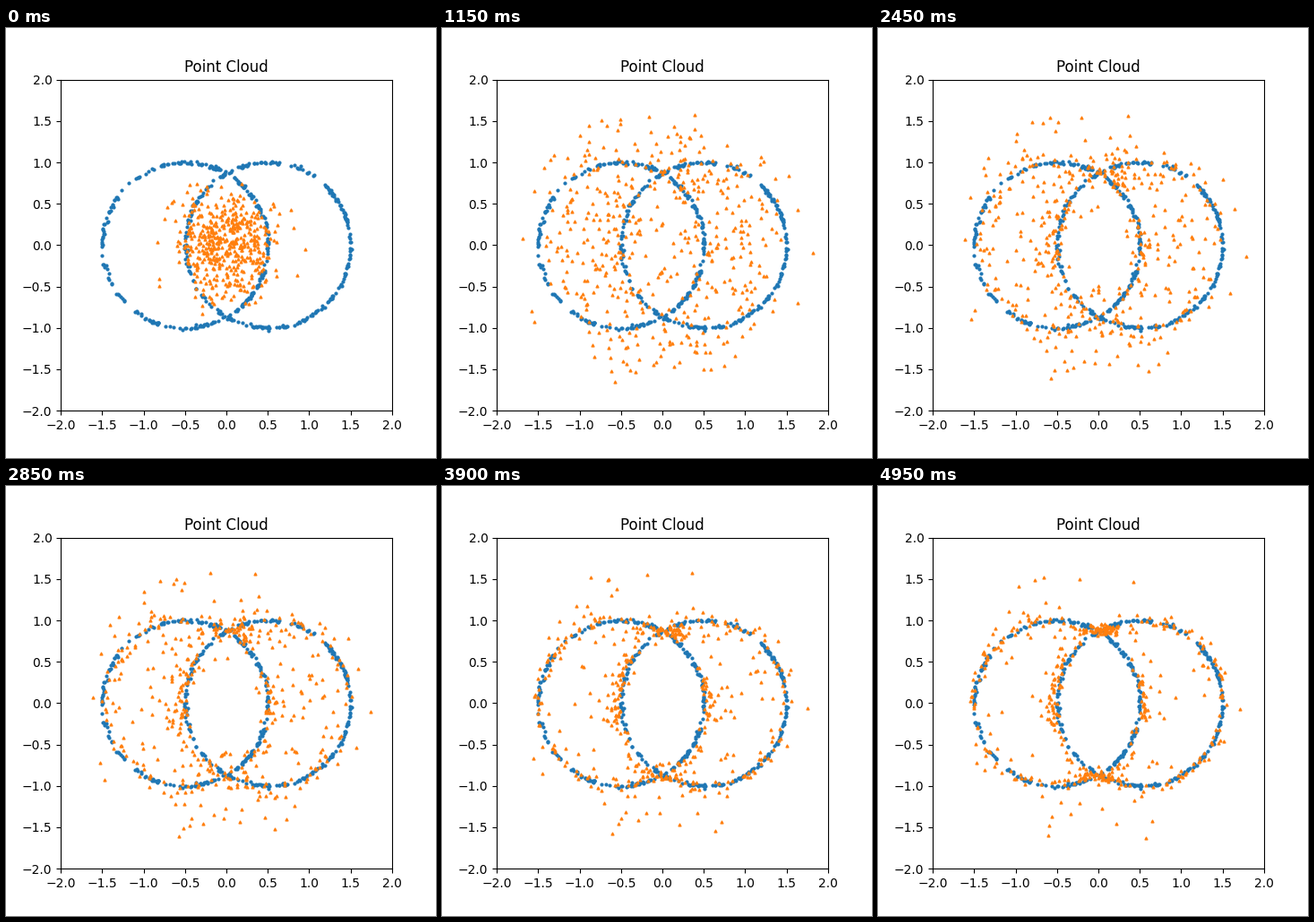
These frames come from a looping animation (480x480 px, 5 s). A matplotlib script:

```python
import numpy as np
import matplotlib.pyplot as plt
from matplotlib.animation import FuncAnimation

FRAMES, INTERVAL = 100, 50
SPREAD_END = 23          # step at which the fast expansion is over
CENTERS = np.array([[-0.5, 0.0], [0.5, 0.0]])
RING_POINTS, CLOUD_POINTS = 250, 470
rng = np.random.default_rng(12)


def polar(radius, angle):
    return np.column_stack([radius * np.cos(angle), radius * np.sin(angle)])


def ring(center):
    """Slightly noisy unit circle."""
    points = center + polar(1.0, rng.uniform(0, 2 * np.pi, RING_POINTS))
    return points + rng.normal(0, 0.01, points.shape)


def norm(p):
    return np.maximum(np.linalg.norm(p, axis=1, keepdims=True), 1e-6)


def spread(k):
    """Share of the expansion done at step k."""
    ease = (1 - np.exp(-k / 6.5)) / (1 - np.exp(-SPREAD_END / 6.5))
    return min(ease, 1.0)


def drift(p):
    """Pull towards both circles, plus pushes out of the middle."""
    v = 0.001 * p + 0.05 * p * np.exp(-norm(p) ** 2 / 0.1)
    for center in CENTERS:
        offset = p - center
        dist = norm(offset)
        gap = dist - 1
        pull = gap * np.exp(-gap ** 2 / (2 * 0.25 ** 2))
        v -= 0.035 * pull * offset / dist
    return v


def cloud_path():
    """Gaussian blob that bursts open and then settles on the circles."""
    r = 0.3 * np.sqrt(-2 * np.log(1 - 0.995 * rng.random(CLOUD_POINTS)))
    start = polar(r, rng.uniform(0, 2 * np.pi, CLOUD_POINTS))
    wide = start * 3.9 / (1 + 1.1 * norm(start))
    path = [start]
    for k in range(1, FRAMES):
        p = path[-1]
        ramp = np.clip((k - 14) / 25, 0, 1)
        step = drift(p) + rng.normal(0, 0.009, p.shape)
        grow = (wide - start) * (spread(k) - spread(k - 1))
        path.append(p + grow + ramp * step)
    return path


target = np.vstack([ring(center) for center in CENTERS])
path = cloud_path()

fig, ax = plt.subplots(figsize=(4.8, 4.8), dpi=100)
ax.set_xlim(-2, 2)
ax.set_ylim(-2, 2)
ax.set_aspect("equal")
ax.set_title("Point Cloud")
ax.scatter(*target.T, s=4, color="C0", marker="o")
cloud = ax.scatter(*path[0].T, s=4, color="C1", marker="^")


def update(k):
    cloud.set_offsets(path[k])
    return cloud,


anim = FuncAnimation(fig, update, frames=FRAMES, interval=INTERVAL,
                     repeat=True, repeat_delay=0)
plt.show()
```
